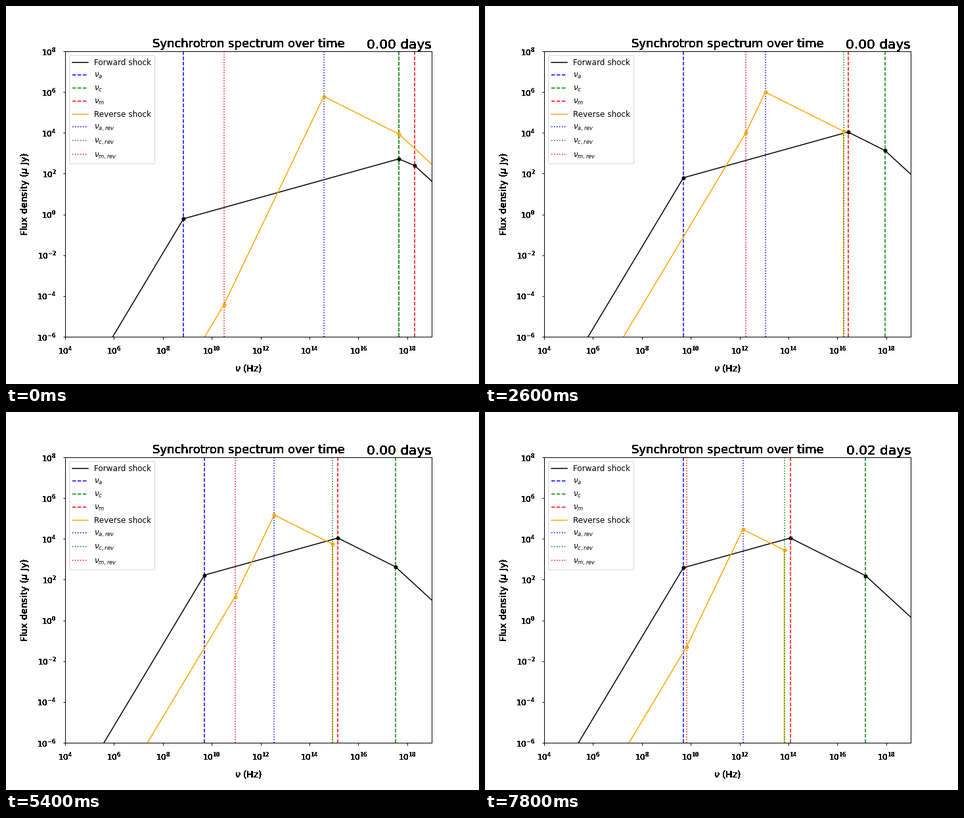
Animation of 720 by 576 pixels, one loop 8000 ms. Source, as a matplotlib script:

```python
import matplotlib.pyplot as plt
import numpy as np
from matplotlib.animation import FuncAnimation

FRAMES, INTERVAL = 40, 200
STEP = 6 / 99          # log10 of the time ratio between frames
P = 2.2                # electron power-law index
MID, HIGH = -(P - 1) / 2, -P / 2
T_CROSS = 0.395        # reverse shock crossing, log10(t / t0)
T_DEC = 8.5 * STEP     # forward shock deceleration
X_MIN, X_MAX = 4, 19
Y_MIN, Y_MAX = -6, 8


def forward(u):
    """Log break frequencies (a, c, m) and the broken power law."""
    if u < T_DEC:
        a, c, m = 8.842 + 0.6 * u, 17.653 - 2 * u, 18.301
        peak, first, second, slope = 2.724 + 3 * u, c, m, -0.5
    else:
        v = u - 13 * STEP
        a, c, m = 9.699, 17.945 - v / 2, 16.435 - 1.5 * v
        peak, first, second, slope = 4.044, m, c, MID
    fa = peak + (a - first) / 3
    f2 = peak + slope * (second - first)
    xs = [X_MIN, a, first, second, X_MAX + 1]
    ys = [fa - 2 * (a - X_MIN), fa, peak, f2, f2 + HIGH * (xs[-1] - second)]
    return (a, c, m), xs, ys


def reverse(u):
    w = u - T_CROSS
    crossing = w < 0
    if crossing:
        ka, kc, km, kf = -3.3, -2, 6, 1.5
    else:
        ka, kc, km, kf = -102 / 175, -54 / 35, -54 / 35, -34 / 35
    a, c, m = 13.280 + ka * w, 16.863 + kc * w, 12.866 + km * w
    peak = 6.381 + kf * w
    fm = peak - 2.5 * (a - m)
    fc = peak + MID * (c - a)
    xs = [X_MIN, m, a, c]
    ys = [fm - 2 * (m - X_MIN), fm, peak, fc]
    if crossing:
        xs.append(X_MAX + 1)
        ys.append(fc + HIGH * (X_MAX + 1 - c))
    else:              # no emission above the cooling break
        xs.append(c)
        ys.append(Y_MIN - 4)
    return (a, c, m), xs, ys


def harden(im, dpi):
    """Turn soft text edges into solid black pixels."""
    out = np.zeros_like(im)
    out[..., 3] = im[..., 3] > 0.12
    return out, 0, 0


def power(values):
    return 10.0 ** np.asarray(values, dtype=float)


class Shock:
    def __init__(self, ax, model, color, label, style, suffix):
        self.model = model
        self.line, = ax.plot([1e5], [1], color=color, lw=1.5, label=label)
        self.breaks = [
            ax.axvline(1e10, color=col, ls=style, lw=1.5,
                       label=rf"$\nu_{{{name}{suffix}}}$")
            for name, col in zip("acm", ("blue", "green", "red"))
        ]
        self.dots, = ax.plot([], [], "o", color=color, ms=5, zorder=3)

    def update(self, u):
        freqs, xs, ys = self.model(u)
        xs, ys = power(xs), power(ys)
        self.line.set_data(xs, ys)
        self.dots.set_data(xs[1:4], ys[1:4])
        for bar, x in zip(self.breaks, power(freqs)):
            bar.set_xdata([x, x])


plt.rcParams["font.family"] = "DejaVu Sans"
fig, ax = plt.subplots(figsize=(10, 8), dpi=72, facecolor="white")
fig.subplots_adjust(left=0.125, right=0.9, bottom=0.125, top=0.88)
ax.set_xscale("log")
ax.set_yscale("log")

shocks = [
    Shock(ax, forward, "black", "Forward shock", "--", ""),
    Shock(ax, reverse, "orange", "Reverse shock", ":", ",rev"),
]

ax.set_xticks(power(np.arange(X_MIN, X_MAX, 2)))
ax.set_yticks(power(np.arange(Y_MIN, Y_MAX + 1, 2)))
ax.minorticks_off()
ax.set_xlim(10.0 ** X_MIN, 10.0 ** X_MAX)
ax.set_ylim(10.0 ** Y_MIN, 10.0 ** Y_MAX)
ax.tick_params(labelsize=12, pad=10, width=1)
for spine in ax.spines.values():
    spine.set_linewidth(1)

ax.set_xlabel(r"$\nu$ (Hz)", fontsize=14, labelpad=10)
ax.set_ylabel(r"Flux density ($\mu$ Jy)", fontsize=14, labelpad=9)
ax.set_title("Synchrotron spectrum over time", fontsize=18)
clock = ax.text(1, 1.01, "", fontsize=20, ha="right", transform=ax.transAxes)
ax.legend(loc="upper left", fontsize=12)

for text in (ax.title, clock, ax.xaxis.label, ax.yaxis.label,
             *ax.get_xticklabels(), *ax.get_yticklabels()):
    text.set_agg_filter(harden)


def draw(i):
    u = i * STEP
    for shock in shocks:
        shock.update(u)
    clock.set_text(f"{1e-4 * 10 ** u:.2f} days")
    return []


anim = FuncAnimation(fig, draw, frames=FRAMES, interval=INTERVAL,
                     init_func=lambda: draw(0), repeat=True, repeat_delay=0)
plt.show()
```
